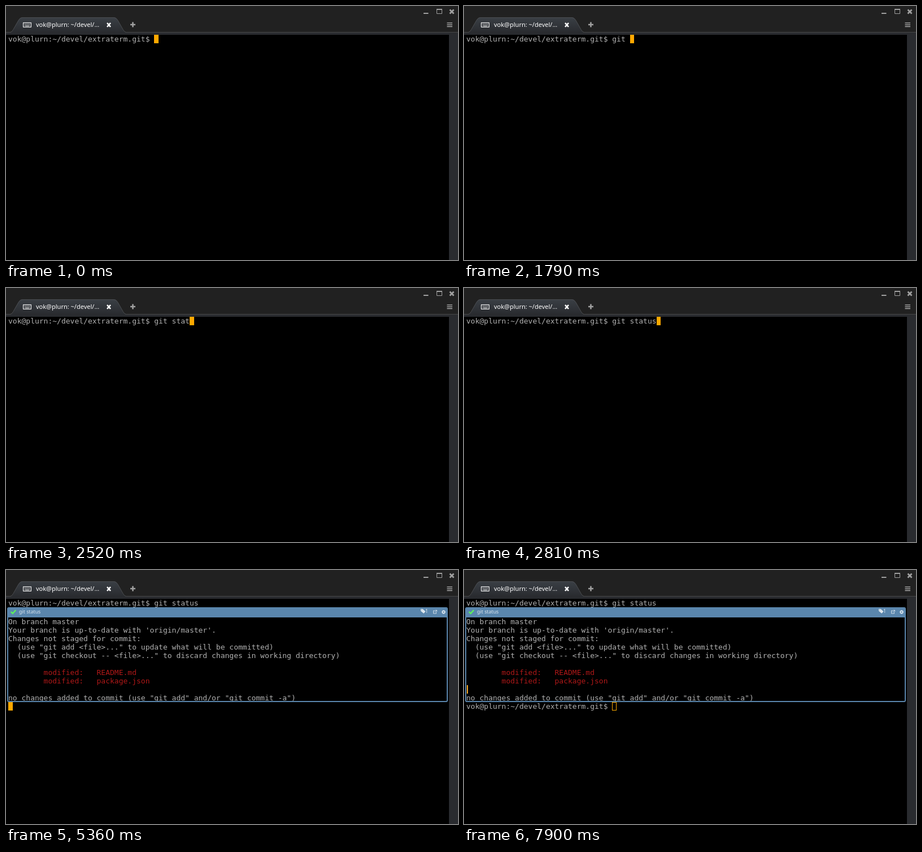
An HTML page that plays this animation: 800 by 450 pixels, repeating every 8 s.

```html
<!DOCTYPE html>
<html lang="en">
<head>
<meta charset="utf-8">
<title>Terminal</title>
<style>
  html, body { margin: 0; width: 100%; height: 100%; overflow: hidden; background: #000; }
  body > *, #frame > * { position: absolute; }
  svg { left: 0; top: 0; }
  pre { margin: 0; left: 4px; font: 13px/15px "DejaVu Sans Mono", monospace; color: #b2b2b2; }
  .label { font: 8.8px/12px "Noto Sans", sans-serif; color: #dce6ee; white-space: pre; }
  #title { left: 53px; top: 25px; font: 11px/16px "Noto Sans", sans-serif; color: #fff; }
  #frame { left: 2px; top: 66px; width: 780px; box-sizing: border-box; overflow: hidden;
           border: 2px solid #5a86ad; border-radius: 3px; }
  #bar { left: 0; top: 0; width: 776px; height: 16px; background: #5a86ad; }
  #output { left: 0; top: 16px; }
  #output b { font-weight: normal; color: #b01818; }
  #cursor { height: 15px; box-sizing: border-box; border: 1px solid #ffa800; }
  #caret { width: 2px; background: #f9ae2c; }
</style>
</head>
<body>
<svg width="800" height="450">
  <defs>
    <linearGradient id="tab" x2="0" y2="1">
      <stop stop-color="#3a3f45"/><stop offset="1" stop-color="#292b2f"/>
    </linearGradient>
  </defs>
  <path fill="#212121" d="M0 0h800v47H0z"/>
  <path fill="#292b2f" d="M0 47h800v403H0z"/>
  <path fill="#000" d="M0 51h784v399H0z"/>
  <path fill="#484848" d="M0 46h800v1H0z"/>
  <path fill="url(#tab)" d="M8 47q3-1 5-5l9-17q3-5 7-5h162q4 0 7 5l9 17q2 4 5 5z"/>
  <path fill="none" stroke="#4b4d50" d="M8 46.5q3-1 5-5l9-16q3-5 7-5h162q4 0 7 5l9 16q2 4 5 5"/>
  <g fill="none" stroke="#fff">
    <path d="M30.5 29.5h14v8h-14z"/>
    <path stroke-dasharray="1 1" d="M32 31.5h11M33 33.5h10"/>
    <path d="M32 35.5h1m1 0h7m1 0h1"/>
    <path stroke-width="2.6" d="M179 30l6 7m0-7l-6 7"/>
  </g>
  <g fill="none" stroke="#a0a0a0">
    <path stroke-width="2.6" d="M220 33h9M224.500 28.500v9"/>
    <path stroke-width="2" d="M739 13h8.500"/>
    <path d="M762.500 6.500h9v7h-9z"/>
    <path stroke-width="2" d="M762 6h10"/>
    <path stroke-width="2.8" d="M785.500 6.500l7 7m0-7l-7 7"/>
    <path stroke-width="1.600" d="M780.500 30h9.500m-9.500 3.200h9.500m-9.500 3.200h9.500"/>
  </g>
</svg>
<div id="title">vok@plurn: ~/devel/…</div>
<pre id="prompt" style="top:51px"></pre>

<div id="frame">
  <div id="bar"></div>
  <pre id="output">On branch master
Your branch is up-to-date with 'origin/master'.
Changes not staged for commit:
  (use "git add &lt;file&gt;..." to update what will be committed)
  (use "git checkout -- &lt;file&gt;..." to discard changes in working directory)

<b>        modified:   README.md
        modified:   package.json</b>

no changes added to commit (use "git add" and/or "git commit -a")</pre>
  <svg width="776" height="16" viewBox="4 68 776 16">
    <g id="gear" fill="none" stroke="#dce9f4">
      <circle cx="12" cy="74" r="2.800" stroke-width="2.200"/>
      <circle cx="12" cy="74" r="4.400" stroke-width="1.400" stroke-dasharray="1.800 1.656"/>
    </g>
    <path id="check" fill="none" stroke="#5cf25c" stroke-width="2.400" d="M8.800 74l3 3 5.500-6"/>
    <path fill="#dce6ee" d="M734 69h3.500l5 4.500-3.300 3.500-5.200-4.500z"/>
    <circle cx="735.600" cy="70.600" r=".7" fill="#5a86ad"/>
    <g fill="none" stroke="#dce6ee">
      <path stroke-width=".9" d="M759.500 72h-3v5h5v-2.500M758.800 74.800l3.500-3.500m-2.300 0h2.500v2.500"/>
      <circle cx="774.500" cy="74.500" r="2.100" stroke-width="1.600"/>
      <circle cx="774.500" cy="74.500" r="3" stroke-width=".8" stroke-dasharray="1.200 1.156"/>
    </g>
  </svg>
  <div class="label" style="left:19px;top:0">git status</div>
  <div class="label" style="left:738px;top:-1px">1</div>
</div>

<pre id="prompt2" style="top:234px"></pre>
<div id="cursor"></div>
<div id="caret"></div>

<script>
const LOOP = 8000, CELL = 7.826;
const PROMPT = "vok@plurn:~/devel/extraterm.git$ ", COMMAND = "git status";
const KEY_TIMES = [1350, 1500, 1640, 1790, 2080, 2230, 2370, 2520, 2670, 2810];
const RUN = 5210, DONE = 5360, READY = 5510;
const CARET_ON = 7160, CARET_UP = 7600, CARET_BLANK = 7900;

const el = id => document.getElementById(id);
const show = (id, on) => el(id).style.visibility = on ? "visible" : "hidden";
const columnX = column => Math.round(4 + column * CELL);

function placeCursor(column, y, filled) {
  const x = columnX(column);
  Object.assign(el("cursor").style, {
    left: x + "px", top: y + "px", width: columnX(column + 1) - x + "px",
    background: filled ? "#ffa800" : "none"
  });
}

function placeCaret(x, y, height) {
  Object.assign(el("caret").style, { left: x + "px", top: y + "px", height: height + "px" });
}

function render(t) {
  const typed = KEY_TIMES.filter(time => t >= time).length;
  el("prompt").textContent = PROMPT + COMMAND.slice(0, typed);
  el("prompt2").textContent = t >= READY ? PROMPT : "";

  el("frame").style.display = t >= RUN ? "block" : "none";
  el("frame").style.height = (t >= DONE ? 168 : 18) + "px";
  show("gear", t < DONE);
  show("check", t >= DONE);

  if (t < RUN) placeCursor(PROMPT.length + typed, 51, true);
  else if (t < READY) placeCursor(0, t < DONE ? 84 : 234, true);
  else placeCursor(PROMPT.length, 234, t < CARET_UP);

  show("caret", t >= CARET_ON);
  if (t < CARET_UP) placeCaret(263, 234, 15);
  else if (t < CARET_BLANK) placeCaret(263, 219, 13);
  else placeCaret(5, 204, 15);
}

function tick() {
  render(performance.now() % LOOP);
  requestAnimationFrame(tick);
}
tick();
</script>
</body>
</html>
```
